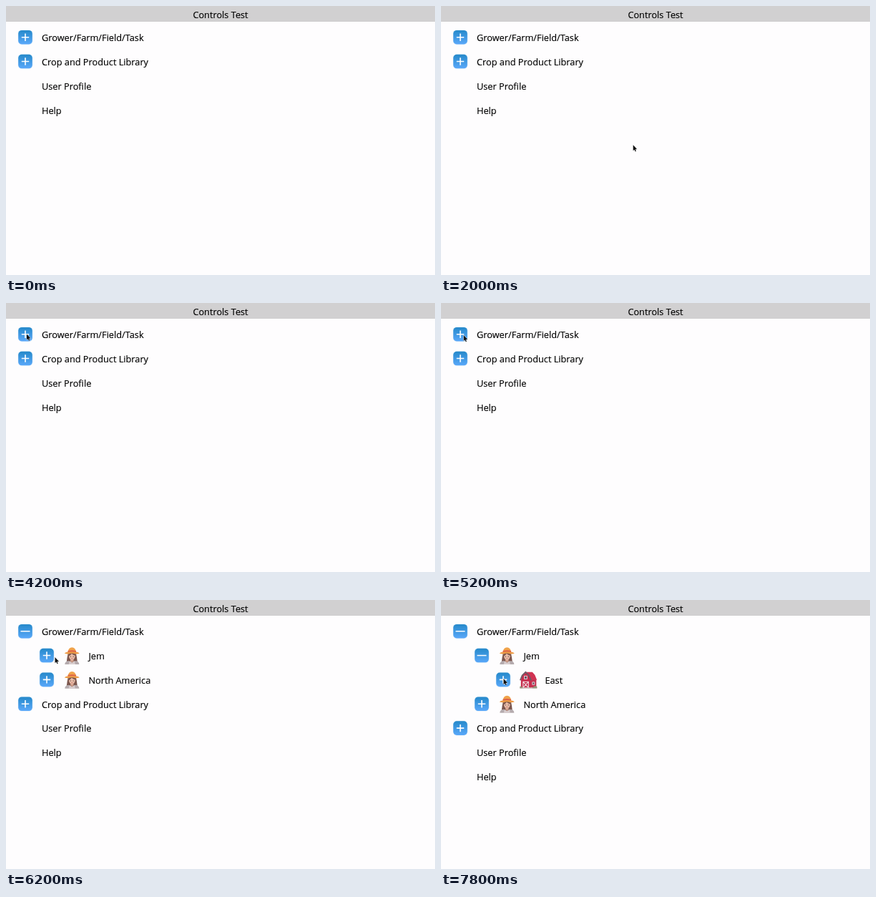
An HTML page for the animation above (8 s loop, 600x376 px).

```html
<!DOCTYPE html>
<html lang="en">
<head>
<meta charset="utf-8">
<title>Controls Test</title>
<style>
html, body { margin: 0; width: 100%; height: 100%; overflow: hidden; background: #fefdfe; }
svg { display: block; width: 100%; height: 100%; }
text { font: 12.75px "Open Sans", "Noto Sans", sans-serif; fill: #000; stroke: #000; stroke-width: .15; }
</style>
</head>
<body>
<svg viewBox="0 0 600 376" xmlns="http://www.w3.org/2000/svg">
  <defs>
    <linearGradient id="blue" x1="0" y1="0" x2="0" y2="1">
      <stop offset="0" stop-color="#2589ca"/>
      <stop offset="1" stop-color="#5aa8fa"/>
    </linearGradient>
    <g id="box">
      <rect x="-10.3" y="-10.3" width="20.6" height="20.6" rx="5.3" fill="#dcebf8"/>
      <rect x="-9.8" y="-9.8" width="19.6" height="19.6" rx="4.8" fill="url(#blue)"/>
    </g>
    <g id="plus">
      <use href="#box"/>
      <path d="M-5.2 0H5.2M0-5.2V5.2" stroke="#fff" stroke-width="1.6"/>
    </g>
    <g id="minus">
      <use href="#box"/>
      <path d="M-6.5 0H6.5" stroke="#fff" stroke-width="1.5"/>
    </g>
    <g id="grower">
      <path d="M-5.5-4Q-7 3-7.5 8.5Q0 12 7.5 8.5Q7 3 5.5-4Z" fill="#7b564d"/>
      <path d="M-10 12Q-10 7.8-5 7L0 9.5L5 7Q10 7.8 10 12Z" fill="#b5abae"/>
      <path d="M-4.5 12L-3.5 7L0 9.8L3.5 7L4.5 12Z" fill="#d8cdce"/>
      <path d="M-2.2 3H2.2V7.2L0 9.5L-2.2 7.2Z" fill="#d29f8b"/>
      <path d="M-4.5-4H4.5V0Q4.2 5 0 6.2Q-4.2 5-4.5 0Z" fill="#e9bca8"/>
      <path d="M-5-4H5V0Q1.5-.8-.5-3Q-2-.5-5 1Z" fill="#7b564d"/>
      <path d="M-2.7 1.2H-1.2M1.2 1.2H2.7" stroke="#5c433e" stroke-width=".9"/>
      <path d="M-1.2 4H1.2" stroke="#bd6a64" stroke-width=".8"/>
      <path d="M-5.8-5Q-5-11.8 0-11.8Q5-11.8 5.8-5Z" fill="#f0a24a"/>
      <path d="M-5.8-7Q0-8.3 5.8-7V-5H-5.8Z" fill="#dd6248"/>
      <path d="M-10.5-3.2Q-9-5.4-5.5-5.2Q0-6.2 5.5-5.2Q9-5.4 10.5-3.2Q5-1.9 3.5-3Q0-4-3.5-3Q-5-1.9-10.5-3.2Z" fill="#ec9b45"/>
    </g>
    <g id="barn">
      <path d="M2-1H11V10.5H2Z" fill="#c53150"/>
      <path d="M-4-11H5.5L9-7L11.8 0H3Z" fill="#d03352"/>
      <path d="M-10.5 0L-8.5-6L-4-10.5L.5-6L3.5 0V10.5H-10.5Z" fill="#c72c4b"/>
      <path d="M-11.5.5L-8.8-6.2L-4-11L.8-6.2L3.8.5" fill="none" stroke="#6e5965" stroke-width="1.7"/>
      <rect x="-5.8" y="-5.5" width="3.8" height="4" fill="#64505f" stroke="#eedde2" stroke-width=".9"/>
      <path d="M-7.5 10.5V2.5H0V10.5M-7.5 2.5L0 10.5M0 2.5L-7.5 10.5" fill="none" stroke="#f1e1e5" stroke-width="1.1"/>
      <path d="M5.5 3H8.5V6.5H5.5Z" fill="#64505f" stroke="#eedde2" stroke-width=".9"/>
      <path d="M-12 11.5V9Q-9.5 7.5-8 11.5ZM12 11.5V9Q8 7 5 11.5Z" fill="#8d9877"/>
      <path d="M-12 11.2H12" stroke="#a58a83" stroke-width=".9"/>
    </g>
  </defs>
  <rect width="600" height="376" fill="#fefdfe"/>
  <rect width="600" height="22" fill="#d1d0d1"/>
  <text x="300" y="17" text-anchor="middle">Controls Test</text>
  <g id="tree"></g>
  <path id="cursor" d="M0 0V8L1.8 6.5L3 9.2L4.2 8.7L3.1 6H5.5Z"
    fill="#111" stroke="#fff" stroke-width=".9" paint-order="stroke"/>
</svg>
<script>
const LOOP = 8000, STEP = 200;
const OPEN_ROOT = 5400, OPEN_GROWER = 6800;
const tree = document.getElementById("tree");
const cursor = document.getElementById("cursor");

// time, x, y of the pointer tip
const path = [
  [200, 318, 223], [1200, 267, 193], [1999, 267, 193], [2000, 268.7, 194.2],
  [3000, 264, 194], [3400, 183.8, 291.5], [3600, 172, 272], [4200, 29, 43.5],
  [5200, 31.7, 45], [5400, 31.7, 45], [6000, 66, 77], [6200, 68.5, 80],
  [6600, 63, 75.5], [6800, 63, 75.5], [7000, 65, 79], [7600, 86.5, 109],
  [7800, 87.5, 110]
];

function pointAt(t) {
  const i = path.findIndex(p => p[0] >= t);
  const b = path[i], a = path[Math.max(0, i - 1)];
  const k = a === b ? 0 : (t - a[0]) / (b[0] - a[0]);
  const e = k * k * (3 - 2 * k);
  return [a[1] + (b[1] - a[1]) * e, a[2] + (b[2] - a[2]) * e];
}

// level, label, toggle, picture
function rowsFor(stage) {
  const rows = [[0, "Grower/Farm/Field/Task", stage ? "minus" : "plus"]];
  if (stage) {
    rows.push([1, "Jem", stage > 1 ? "minus" : "plus", "grower"]);
    if (stage > 1) rows.push([2, "East", "plus", "barn"]);
    rows.push([1, "North America", "plus", "grower"]);
  }
  return rows.concat([[0, "Crop and Product Library", "plus"], [0, "User Profile"], [0, "Help"]]);
}

const use = (id, x, y) => id ? `<use href="#${id}" x="${x}" y="${y}"/>` : "";

function drawTree(stage) {
  tree.innerHTML = rowsFor(stage).map(([level, label, toggle, pic], i) => {
    const x = 30 * level, y = 43.7 + 33.85 * i;
    return use(toggle, x + 27, y) + use(pic, x + 62.3, y + .4) +
      `<text x="${x + (pic ? 85.4 : 50)}" y="${Math.round(y + 5.3)}">${label}</text>`;
  }).join("");
}

let shown = -1;
function render(ms) {
  const t = Math.floor((ms % LOOP) / STEP) * STEP;
  const stage = (t >= OPEN_ROOT) + (t >= OPEN_GROWER);
  if (stage !== shown) drawTree(shown = stage);
  cursor.style.display = t < path[0][0] ? "none" : "";
  const [x, y] = pointAt(t);
  cursor.setAttribute("transform", `translate(${x} ${y})`);
}

const start = performance.now();
function tick(now) {
  render(Math.max(0, now - start));
  requestAnimationFrame(tick);
}
render(0);
requestAnimationFrame(tick);
</script>
</body>
</html>
```
